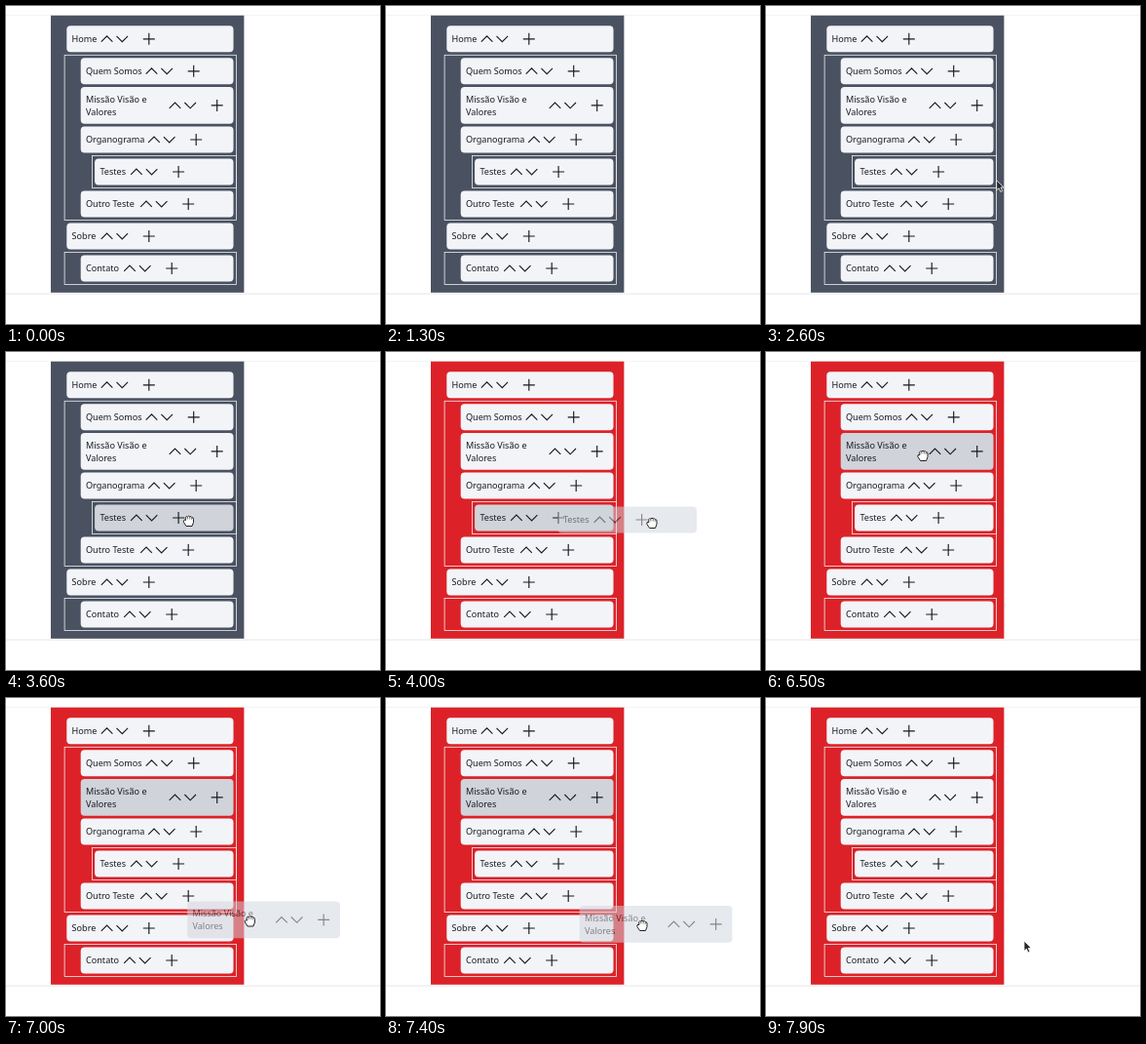
Write an HTML page that moves like this. It is 384x326 px and loops after 8 s.

```html
<!DOCTYPE html>
<html lang="pt">
<head>
<meta charset="utf-8">
<title>Menu</title>
<style>
  html, body { margin: 0; width: 100%; height: 100%; overflow: hidden; background: #fff; }
  svg { display: block; width: 384px; height: 326px; }
  text { font: 9.1px "Noto Sans", "Open Sans", sans-serif; fill: #181b22; }
  .icon { fill: none; stroke: #181b22; stroke-width: 1.15; }
  .group { fill: none; stroke: #eceef1; stroke-width: 0.8; }
</style>
</head>
<body>
<svg id="stage" viewBox="0 0 384 326">
  <path d="M0 9.5H384" stroke="#f4f4f4"/>
  <path d="M0 295H384" stroke="#e6e6e6"/>
  <rect id="panel" x="46" y="9.7" width="198.4" height="284.1"/>
  <g id="rows"></g>
  <g id="ghosts"></g>
  <path id="arrow" d="M0 0V10.3L2.4 8.2L4.1 12L6 11.1L4.3 7.5H7.4Z"
    fill="#25272b" stroke="#fff" stroke-width="0.8"/>
  <g id="hand" stroke="#222" stroke-linejoin="round">
    <path fill="#fff" d="M-2.5 5.5L-5 1.5Q-5.8-.5-4-.8L-3.2-.2V-3.4Q-2.5-5-1.2-3.9Q0-5.6 1.2-4.2Q2.7-5 3.3-3.4Q5-3.6 5-1.8V1.5L3.5 5.5Z"/>
    <path fill="none" stroke-width="0.6" d="M-1.1-3.7V-1.5M1.2-4V-1.5M3.2-3.2V-1.2"/>
  </g>
</svg>
<script>
const LOOP = 8000, STEP = 100, RED_AT = 3700;
const PLAIN = "#f3f4f8", GREY = "#d0d3d9";
const INDENT = 14.4, LEFT = 62.3, RIGHT = 233.5;
const $ = id => document.getElementById(id);

// Menu tree in reading order; width is the room the label takes before its icons.
const menu = [
  { label: "Home", level: 0, width: 25 },
  { label: "Quem Somos", level: 1, width: 56.5 },
  { label: "Missão Visão e|Valores", level: 1, width: 80.5 },
  { label: "Organograma", level: 1, width: 59 },
  { label: "Testes", level: 2, width: 26.5 },
  { label: "Outro Teste", level: 1, width: 51 },
  { label: "Sobre", level: 0, width: 25 },
  { label: "Contato", level: 1, width: 34 }
];

// Rows stack downwards, with a wider gap wherever the level changes.
let top_ = 20.3;
menu.forEach((row, i) => {
  const next = menu[i + 1];
  row.lines = row.label.split("|");
  row.x = LEFT + INDENT * row.level;
  row.y = top_;
  row.height = 27 + 10.8 * (row.lines.length - 1);
  top_ += row.height + (next && next.level === row.level ? 2.7 : 6);
});

function rowMarkup({ x, y, height, width, lines }, fill) {
  const mid = y + height / 2, textX = x + 5.3, iconX = textX + width + 11;
  const labels = lines.map((line, i) => {
    const base = mid + 3.2 + (i - (lines.length - 1) / 2) * 13;
    return `<text x="${textX}" y="${base}">${line}</text>`;
  }).join("");
  const icons = `M${iconX - 5.8} ${mid + 2.9}l5.8-5.8l5.8 5.8m4.1-5.8l5.8 5.8l5.8-5.8` +
    `M${iconX + 37.2} ${mid}h12m-6-6v12`;
  return `<g><rect x="${x}" y="${y}" width="${RIGHT - x}" height="${height}" rx="4" fill="${fill}"/>` +
    `${labels}<path class="icon" d="${icons}"/></g>`;
}

// A group starts where the level rises and ends before it falls back.
function groupMarkup(first, i) {
  if (!i || first.level <= menu[i - 1].level) return "";
  const after = menu.findIndex((row, j) => j > i && row.level < first.level);
  const last = menu[(after < 0 ? menu.length : after) - 1];
  const x = first.x - 16.6 + INDENT * (first.level > 1 ? 1 : 0) - (first.level > 1 ? INDENT - 14 : 0);
  const y = first.y - 3;
  return `<rect class="group" x="${x}" y="${y}" width="${236.4 - x}" ` +
    `height="${last.y + last.height + 3 - y}"/>`;
}
</script>
<script>
const drags = [
  { row: 4, grab: 3600, lift: 3700, drop: 4900, end: 5300 },
  { row: 2, grab: 6100, lift: 6600, drop: 7500, end: 7800 }
];

// Pointer stops: time, x, y
const stops = [
  [1900, 318, 246], [2300, 246, 190], [2500, 246, 190], [2600, 236.7, 178.5],
  [3200, 187.5, 173], [3600, 187.5, 173], [4000, 273, 175], [4400, 293, 178],
  [4900, 275, 179], [5000, 296.7, 182], [5150, 290, 245], [5300, 243, 208],
  [6100, 141, 103], [6500, 161, 106], [7100, 253, 232], [7400, 263, 233],
  [7700, 264, 265], [7900, 265, 249]
];

const groups = menu.map((row, i) => groupMarkup(row, i)).join("");
$("rows").innerHTML = groups + menu.map(row => rowMarkup(row, PLAIN)).join("");
$("ghosts").innerHTML = drags.map(d => rowMarkup(menu[d.row], "#d1d5dd")).join("");
const plates = [...$("rows").querySelectorAll("g > g > rect")];
const ghosts = [...$("ghosts").children];

const easeOut = k => 1 - (1 - k) ** 2;
const clamp = k => Math.max(0, Math.min(1, k));
const move = (el, x, y) => el.setAttribute("transform", `translate(${x} ${y})`);
const show = (el, on) => el.setAttribute("visibility", on ? "visible" : "hidden");

function pointerAt(t) {
  let i = 0;
  while (i < stops.length - 2 && stops[i + 1][0] <= t) i++;
  const [t0, x0, y0] = stops[i], [t1, x1, y1] = stops[i + 1];
  const k = easeOut(clamp((t - t0) / (t1 - t0)));
  return [x0 + (x1 - x0) * k, y0 + (y1 - y0) * k];
}

function draw(t) {
  const [px, py] = pointerAt(t);
  const holding = drags.some(d => t >= d.grab && t < d.drop);
  $("panel").setAttribute("fill", t < RED_AT ? "#4a5261" : "#dc2228");
  drags.forEach((d, i) => {
    const [gx, gy] = pointerAt(d.grab);
    const [x, y] = pointerAt(Math.min(t, d.drop));
    const fade = 1 - clamp((t - d.drop) / (d.end - d.drop));
    plates[d.row].setAttribute("fill", t >= d.grab && t < d.end ? GREY : PLAIN);
    move(ghosts[i], x - gx, y - gy);
    ghosts[i].setAttribute("opacity", t < d.lift ? 0 : 0.52 * fade);
  });
  move($("arrow"), px, py);
  move($("hand"), px, py);
  show($("arrow"), t >= stops[0][0] && !holding);
  show($("hand"), holding);
}

function tick() {
  draw(Math.floor(performance.now() % LOOP / STEP) * STEP);
  requestAnimationFrame(tick);
}
tick();
</script>
</body>
</html>
```
